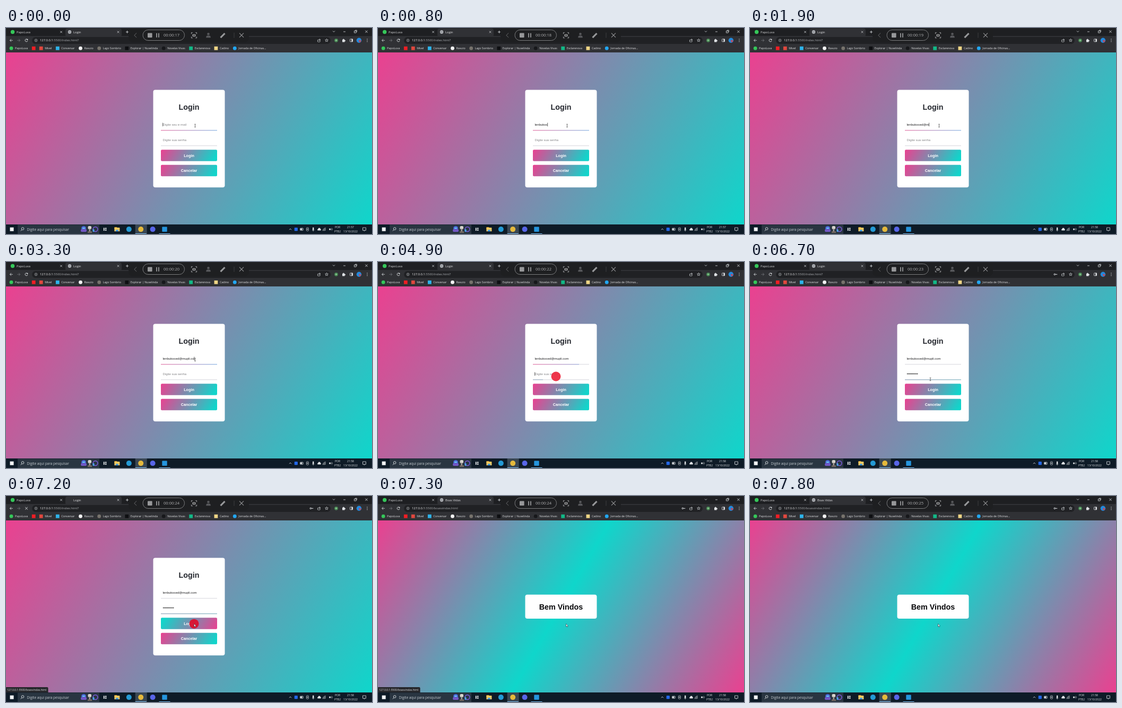
An HTML page with a canvas that plays this animation: 690 px wide and 388 px high, repeating every 8000 ms.

```html
<!DOCTYPE html>
<html lang="pt-BR">
<head>
<meta charset="utf-8">
<title>Login</title>
<style>
html, body { margin: 0; width: 100%; height: 100%; overflow: hidden; background: #000; }
canvas { display: block; width: 690px; height: 388px; }
</style>
</head>
<body>
<canvas id="stage"></canvas>
<script>
const W = 690, H = 388, LOOP = 8000, STEP = 100;
const canvas = document.getElementById('stage');
const c = canvas.getContext('2d');
const dpr = window.devicePixelRatio || 1;
canvas.width = W * dpr;
canvas.height = H * dpr;

const UI = '"Open Sans", "Noto Sans", sans-serif';
const PAGE = '"Liberation Sans", Arial, sans-serif';
const PINK = '#ea4190', TEAL = '#0fd6cb', INK = '#dfe2e5';
const MAIL = 'PapoLuva', EMAIL = 'lenbukoced@mupli.com', HOST = '127.0.0.1';
const VIEW = { x: 0, y: 46, w: W, h: 324 }, MIDDLE = 345;

// Moments of the story, in ms
const FOCUS = 4840, KEYS = 5400, HOVER = 6800, LOAD = 7100, WELCOME = 7300, LOADED = 7600;

const clamp = x => Math.min(1, Math.max(0, x));
const ramp = (t, a, b) => clamp((t - a) / (b - a));
const mix = (a, b, k) => a + (b - a) * k;

// Smooth step close to the CSS "ease" curve
const ease = k => 1 - Math.pow(1 - Math.pow(k, 1.3), 2.6);

// Typing pace: a quick start, a pause for the sign, then a steady rhythm
function typedCount(t) {
  const pace = [[200, 1], [800, 8], [1900, 12], [2300, 13], [3100, 17], [3400, 20]];
  if (t < pace[0][0]) return 0;
  let n = pace[0][1];
  for (let i = 1; i < pace.length; i++)
    n += (pace[i][1] - pace[i - 1][1]) * ramp(t, pace[i - 1][0], pace[i][0]);
  return Math.floor(n + 1e-6);
}

const dotCount = t => t < KEYS ? 0 : 1 + Math.round(9 * ramp(t, 5600, 6100));
const seconds = t => 17 + Math.floor((t + 700) / 1060);

function mouseAt(t) {
  const a = ramp(t, 4450, 4800), b = ramp(t, 6620, 7000);
  return [mix(mix(356, 335.5, a), 354.5, b), mix(mix(184, 215.5, a), 240.7, b)];
}

function rect(x, y, w, h, fill, r = 0) {
  c.fillStyle = fill;
  c.beginPath();
  c.roundRect(x, y, w, h, r);
  c.fill();
}

const square = (x, y, r, fill, round = 0) => rect(x - r, y - r, 2 * r, 2 * r, fill, round);

function frame(x, y, w, h, color, r = 0, lw = .8) {
  c.strokeStyle = color;
  c.lineWidth = lw;
  c.beginPath();
  c.roundRect(x, y, w, h, r);
  c.stroke();
}

function dot(x, y, r, fill) {
  c.fillStyle = fill;
  c.beginPath();
  c.arc(x, y, r, 0, Math.PI * 2);
  c.fill();
}

function ring(x, y, r, color, lw = .8, from = 0, to = 2) {
  c.strokeStyle = color;
  c.lineWidth = lw;
  c.beginPath();
  c.arc(x, y, r, from * Math.PI, to * Math.PI);
  c.stroke();
}

// Open path through points relative to (x, y)
function line(x, y, pts, color = INK, lw = .8, fill) {
  c.strokeStyle = color;
  c.lineWidth = lw;
  c.beginPath();
  for (const [dx, dy] of pts) c.lineTo(x + dx, y + dy);
  if (fill) { c.fillStyle = fill; c.fill(); }
  c.stroke();
}

const dash = (x, y, r, color, lw) => line(x, y, [[-r, 0], [r, 0]], color, lw);
const bar = (x, y, r, color, lw) => line(x, y, [[0, -r], [0, r]], color, lw);
const vee = (x, y, w, h, color, lw) => line(x, y, [[-w, -h], [0, h], [w, -h]], color, lw);
const angle = (x, y, w, h, color, lw) => line(x, y, [[w, -h], [-w, 0], [w, h]], color, lw);

function cross(x, y, r, color = INK, lw = .8) {
  line(x, y, [[-r, -r], [r, r]], color, lw);
  line(x, y, [[-r, r], [r, -r]], color, lw);
}

// Text centred vertically on y by its capitals
function text(s, x, y, size, color, font = UI, weight = 400, align = 'left') {
  c.font = `${weight} ${size}px ${font}`;
  c.textAlign = align;
  c.fillStyle = color;
  c.fillText(s, x, y + size * .36);
  return c.measureText(s).width;
}

const title = (s, y, size, color) => text(s, MIDDLE, y, size, color, PAGE, 700, 'center');

// Same geometry as a 120deg CSS gradient
function slanted({ x, y, w, h }, ...colors) {
  const dx = Math.sqrt(3) / 2, dy = .5, half = (w * dx + h * dy) / 2;
  const mx = x + w / 2, my = y + h / 2;
  const g = c.createLinearGradient(mx - dx * half, my - dy * half, mx + dx * half, my + dy * half);
  colors.forEach((col, i) => g.addColorStop(i / (colors.length - 1), col));
  return g;
}

function drawTabs(t) {
  const y = 7.5, loading = t >= LOAD && t < WELCOME;
  rect(0, 0, W, 15, '#1e1f22');
  rect(112, 1, 106, 16, '#303135', 4);
  dot(12.5, y, 3.7, '#35c759');
  text(MAIL, 20, y, 5.7, '#d5d6d8');
  if (!loading) {
    dot(120, y, 3.2, '#b9bcc1');
    dash(120, y, 2.4, '#55585d', .9);
  }
  text(t < WELCOME ? 'Login' : 'Boas Vidas', 127, y, 5.7, '#e6e7e9');
  for (const x of [104, 211.5]) cross(x, y, 1.8);
  dash(228.5, y, 2.6);
  bar(228.5, y, 2.6);
  vee(618, 6.5, 2, 1);
  dash(638, 7, 2);
  frame(656.5, 5.5, 3.6, 3.6, INK);
  line(658, 4.2, [[0, 0], [3.3, 0], [3.3, 3.5]]);
  cross(679.5, 6.8, 2.2);
}

function drawToolbar(t) {
  const y = 23.3, loading = t >= LOAD && t < WELCOME;
  rect(0, 15, W, 31, '#303135');
  angle(8.6, y, 1.3, 2.5);
  dash(10, y, 2.7);
  angle(25.4, y, -1.3, 2.5, '#77797d');
  dash(24, y, 2.7, '#77797d');
  if (loading) cross(38.5, y, 2.3, INK, .9);
  else {
    ring(38.5, y, 2.5, INK, .9, .1, 1.7);
    square(40.3, y - 1.5, 1, INK);
  }

  rect(49, 17, 563, 13, '#202124', 6.5);
  ring(56.5, y, 2.4, '#b7babd', .7);
  bar(56.5, y, 1.2, '#b7babd');
  const w = text(HOST, 64, y, 5.85, '#f4f5f6');
  text(':5500/' + (t < WELCOME ? 'index.html?' : 'boasvindas.html'), 64 + w, y, 5.85, '#a8abaf');
  if (t >= 5700) {
    ring(574.3, y, 1.3, INK, 1);
    dash(577.4, y, 1.9, INK, 1);
  }
  frame(587.5, 22.5, 4.6, 3.6, INK, .5, .7);
  angle(591.5, 21.8, -1.3, 1.3, INK, .7);
  const star = Array.from({ length: 11 }, (_, i) => {
    const r = i % 2 ? 1.3 : 3, a = (i / 5 - .5) * Math.PI;
    return [r * Math.cos(a), r * Math.sin(a)];
  });
  line(604.5, y, star, INK, .7);

  dot(622.5, y, 3.4, '#4b8d57');
  dot(622.5, y, 1.2, '#9fd0a4');
  square(636.3, 24.1, 2.3, INK, .5);
  dot(636.3, 21.6, 1.1, INK);
  dot(639, 24, 1.1, INK);
  frame(648.6, 20.8, 5, 5, INK, .5);
  rect(651.4, 20.8, 2.4, 5, INK);
  dot(665.5, y, 4.7, '#2389dc');
  dot(667.2, 24.6, 2.1, '#c04a5e');
  for (let i = -1; i < 2; i++) dot(681, y + i * 2.4, .65, INK);
}

// Each label starts after its icon, each icon after the label before
function drawBookmarks() {
  const y = 38.2, marks = [
    [dot, '#35c759', MAIL], [square, '#f01e24', ''], [square, '#e0483e', 'Mivel'],
    [square, '#2db4ea', 'Conversar'], [dot, '#f4f4f4', 'Ravuto'], [dot, '#77736c', 'Lago Sombrio'],
    [square, '#0e0f12', 'Explorar | Nuvelinda'], [dot, '#17181b', 'Novelas Vivas'],
    [square, '#12b886', 'Esclarenova'], [square, '#efd585', 'Cadino'], [dot, '#22a7f2', 'Jornada de Oficinas...']
  ];
  let x = 10;
  for (const [icon, color, label] of marks) {
    icon(x, y, 3.4, color);
    x += label ? 18 + text(label, x + 7, y, 5.3, '#e2e3e5') : 14;
  }
}

function drawRecorder(t) {
  const y = 13.7, ink = '#97989a';
  rect(231, -8, 227, 34.5, 'rgba(30,31,33,.95)', 8);
  angle(244, y, 2.2, 4.2, '#6a6b6e', 1);
  frame(258, 3.5, 78.5, 20, '#7c7d7f', 10, 1);
  square(271.3, y, 4.3, ink, 1);
  for (const x of [284, 288]) bar(x, y, 4, ink, 1.8);
  text('00:00:' + seconds(t), 297, y, 7.6, '#b0b1b3');
  for (const sx of [-5, 5])
    for (const sy of [-5, 5])
      line(354.5 + sx, y + sy, [[-sx / 2, 0], [0, 0], [0, -sy / 2]], ink, 1.1);
  rect(351.5, 11.7, 6, 4.6, ink, .8);
  dot(354.5, 14, 1.3, '#333');
  dot(381.5, 11.3, 2.3, '#57585b');
  rect(377.3, 14.3, 8.4, 4, '#57585b', [3, 3, 0, 0]);
  line(409, y, [[-4.5, 4.5], [-2.5, 2.5], [3.5, -3.5]], ink, 3.2);
  bar(430, y, 5, '#47484a');
  cross(444, y, 4, ink, 1.1);
}

function drawCard(h) {
  rect(MIDDLE - 67.5, 208.4 - h / 2, 135, h, '#fff', 4);
}

function drawButton(y, label, shift) {
  const x = 292, w = 106, h = 21.5;
  rect(x, y, w, h, slanted({ x: x - w * shift, y, w: w * 2, h }, PINK, TEAL, PINK), 2);
  title(label, y + h / 2, 7.2, '#fff');
}

function drawField(y, value, hint, focus, colors) {
  const rule = { x: 292, y: y + 10.4, w: 106, h: .9 };
  const w = text(value || hint, 295.5, y, 6, value ? '#1c1c1e' : '#858588', PAGE);
  rect(rule.x, rule.y, rule.w, rule.h, '#d5d5dc');
  rect(rule.x, rule.y, rule.w * focus, rule.h, slanted(rule, ...colors));
  return value ? w : 0;
}

const drawCaret = (w, y) => rect(295.4 + w, y - 3.4, .7, 6.8, '#222');

function drawLogin(t) {
  const mailY = 181.9, passY = 210.9, n = dotCount(t);
  const focus = ease(ramp(t, FOCUS, FOCUS + 450));
  rect(VIEW.x, VIEW.y, VIEW.w, VIEW.h, slanted(VIEW, PINK, TEAL));
  drawCard(183.8);
  title('Login', 148.4, 14.3, '#23262d');

  const w = drawField(mailY, EMAIL.slice(0, typedCount(t)), 'Digite seu e-mail', 1 - focus, ['#ee6aa2', '#7fb4ea']);
  if (t < 3900) drawCaret(w, mailY);
  drawField(passY, '', n ? '' : 'Digite sua senha', focus, ['#8c9fba', '#78b4c0']);
  for (let i = 0; i < n; i++) dot(296.7 + i * 2.1, passY - .3, .85, '#111');
  if (t > FOCUS && t < 6100) drawCaret(n * 2.1, passY);

  drawButton(229.2, 'Login', ease(ramp(t, HOVER, HOVER + 400)));
  drawButton(257.7, 'Cancelar', 0);
}

function drawWelcome() {
  rect(VIEW.x, VIEW.y, VIEW.w, VIEW.h, slanted(VIEW, PINK, TEAL, PINK));
  drawCard(45.2);
  title('Bem Vindos', 208.7, 14.35, '#08080a');
}

function drawStatus() {
  rect(0, 360, 79.5, 10, '#26272b', [0, 2, 0, 0]);
  text(HOST + ':5500/boasvindas.html', 2, 365.3, 5, '#dfe1e3');
}

function drawSearch() {
  rect(22, 370.5, 154, 17.5, '#293541');
  ring(31.5, 378, 2.3, INK, .9);
  line(30, 379.8, [[0, 0], [-2.3, 2.5]], INK, .9);
  text('Digite aqui para pesquisar', 39.5, 379.2, 6.5, '#c6ccd1');
  dot(146.5, 377.5, 4.5, '#4865d6');
  rect(141, 379, 11, 5, '#7157c4', 2);
  rect(144, 376, 5, 2, '#72d2ee', 1);
  rect(154.5, 373, 6.5, 6, '#d5d3cc', 2);
  rect(156.5, 378, 2.5, 6, '#a69b93');
  rect(154, 383, 8, 3, '#71665f');
  ring(168.5, 379, 4.4, '#7457cc', 1.8);
  rect(163.5, 379, 3, 5, '#4aa5e8', 1.2);
}

function drawApps(y) {
  const slot = i => 187 + i * 22.4;
  rect(slot(3) - 10.5, 370, 22, 18, '#3a4753');
  for (const i of [3, 5]) rect(slot(i) - 10.5, 387, 21, 1, '#76b9ed');
  bar(slot(0) - 2.2, y, 2.8, INK, 2);
  for (const dy of [-1.6, 1.6]) square(slot(0) + 1.2, y + dy, 1.2, INK);
  rect(slot(1) - 5, y - 4, 5, 4, '#d59b2c', .5);
  rect(slot(1) - 5, y - 3, 10, 7, '#f2ca62', .6);
  rect(slot(1) - 2.5, y + 1, 5, 3, '#4a9cdb');
  ['#249ad5', '#e5b93c', '#5865e8'].forEach((color, i) => dot(slot(i + 2), y, 5, color));
  square(slot(5), y, 4.7, '#2595de', 1);
}

function drawTray(y) {
  const glyphs = [
    x => vee(x, y, 2.2, -1.1),
    x => square(x, y, 3.1, '#2468e8', 1),
    x => { frame(x - 3, y - 2, 5.6, 4, INK, .5); rect(x - 2.5, y - 1.5, 3.3, 3, INK); },
    x => { frame(x - 2, y - 3, 4, 6, INK, 1, .7); dot(x, y, 1, INK); },
    x => { bar(x, y - 1.2, 2.2, INK, 2.4); bar(x, y + 2, 2, INK); dash(x, y + 1.6, 2); },
    x => { dot(x + .6, y - .2, 2.4, INK); rect(x - 3, y - .2, 7, 2.4, INK, 1.2); },
    x => { for (let r = 1.8; r < 6; r += 1.8) ring(x + 2, y + 3, r, INK, .8, 1, 1.5); },
    x => { square(x - 1, y, 1.4, INK); for (const r of [1.5, 3]) ring(x + .5, y, r, INK, .6, -.3, .3); }
  ];
  glyphs.forEach((glyph, i) => glyph(536 + i * 10.8));
}

function drawTaskbar(t) {
  const y = 379.1;
  rect(0, 370, W, 18, '#0e1b27');
  square(11, y, 3.5, '#f4f6f8');
  drawSearch();
  drawApps(y);
  drawTray(y);
  const label = (s, x, dy) => text(s, x, y + dy, 5.1, INK, UI, 400, 'center');
  label('POR', 625, -4);
  label('PTB2', 625, 4);
  label(t < 1000 ? '21:57' : '21:58', 649.5, -4);
  label('13/10/2022', 649.5, 4);
  frame(672.5, y - 3, 6, 5, INK);
  vee(675.5, y + 2.8, 1, .6);
}

function drawMouse(t) {
  const [x, y] = mouseAt(t);
  const pressed = Math.abs(t - 4900) <= 100 || t === 7200;
  if (pressed) dot(x, y, 9, t < HOVER ? 'rgba(237,43,65,.95)' : 'rgba(218,18,48,.96)');
  if (y > 228) {
    line(x, y, [[0, 0], [0, 5.4], [1.3, 4.4], [2.2, 6.2], [3.1, 5.7], [2.3, 4], [3.8, 3.9], [0, 0]], '#20242c', .55, '#fff');
  } else if (!pressed) {
    bar(x + .5, y, 2.6, '#333', .7);
    for (const d of [-2.8, 2.8]) dash(x + .5, y + d, 1.4, '#333', .6);
  }
}

function draw(t) {
  c.setTransform(dpr, 0, 0, dpr, 0, 0);
  if (t < WELCOME) drawLogin(t); else drawWelcome();
  drawTabs(t);
  drawToolbar(t);
  drawBookmarks();
  drawRecorder(t);
  if (t > HOVER && t < LOADED) drawStatus();
  drawTaskbar(t);
  drawMouse(t);
}

const start = performance.now();
function tick() {
  const t = (performance.now() - start) % LOOP;
  draw(Math.floor(t / STEP) * STEP);
  requestAnimationFrame(tick);
}
tick();
</script>
</body>
</html>
```
